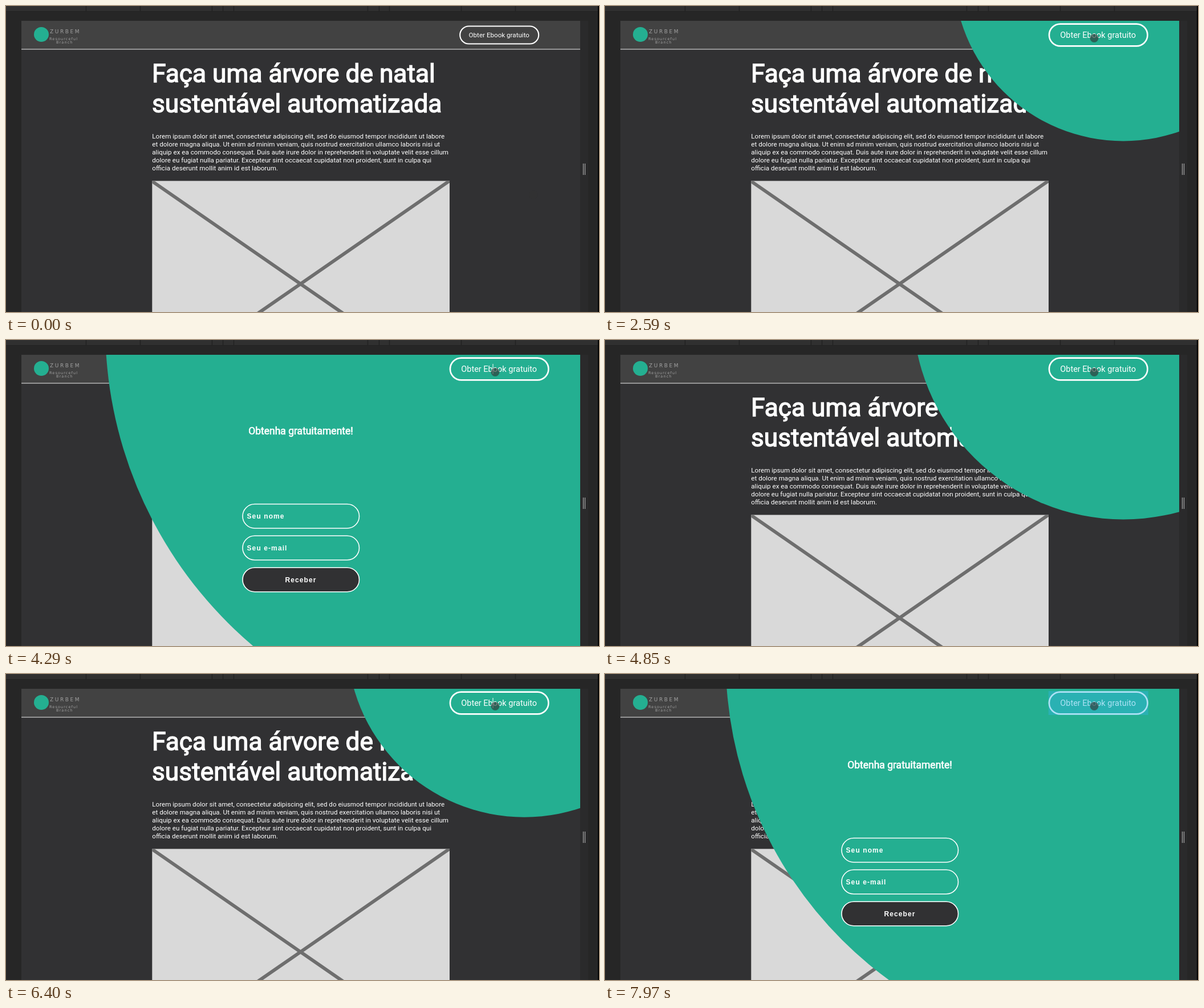
These frames come from a looping animation (1040 by 538 pixels, 8000 ms). An HTML page:

```html
<!DOCTYPE html>
<html lang="pt-BR">
<head>
<meta charset="utf-8">
<title>Ebook gratuito</title>
<style>
html, body { margin: 0; width: 100%; height: 100%; overflow: hidden; background: #262626; }
svg { display: block; width: 1040px; height: 538px; }
text { font-family: Roboto, sans-serif; fill: #fff; white-space: pre; }
.title { font-size: 44.3px; stroke: #fff; stroke-width: 1.4px; }
.body { font-size: 11.63px; }
.lead { font-size: 17.5px; stroke: #fff; stroke-width: .65px; }
.field { font: bold 12px "Liberation Sans", Arial, sans-serif; letter-spacing: 1.1px; }
.brand text { font-family: "DejaVu Sans", sans-serif; fill: #a2a2a2; }
.pill { fill: none; stroke: #fff; stroke-width: 1.6; }
.cross { stroke: #6e6e6e; stroke-width: 6; filter: blur(.7px); }
</style>
</head>
<body>
<svg viewBox="0 0 1040 538">
  <defs>
    <clipPath id="page"><rect x="27" y="26" width="980" height="512"/></clipPath>
    <clipPath id="photo"><rect x="256.3" y="307.4" width="521.7" height="362"/></clipPath>
    <clipPath id="reveal"><circle id="hole" cx="909" cy="-86" r="0"/></clipPath>
  </defs>

  <rect width="1040" height="538" fill="#262626"/>
  <rect width="1040" height="9" fill="#303030"/>
  <path d="M0 9.5H1040" stroke="#222"/>
  <path id="ticks" stroke="#222" stroke-width="1.5"/>
  <rect x="1007" y="26" width="14" height="512" fill="#2a2a2b"/>
  <rect x="1038" width="2" height="538" fill="#000"/>
  <path d="M1012.5 277V297M1015.5 277V297" stroke="#a8a8a8" stroke-width="1.2"/>

  <g clip-path="url(#page)">
    <rect x="27" y="26" width="980" height="512" fill="#313133"/>
    <rect x="27" y="26" width="980" height="50" fill="#424242"/>
    <path d="M27 76H1007" stroke="#b4b4b4" stroke-width="1.5"/>
    <g class="brand">
      <circle cx="62" cy="50" r="13" fill="#24af91"/>
      <text x="77" y="48" font-size="9" letter-spacing="2.6">ZURBEM</text>
      <text x="76" y="59.5" font-size="6.5" letter-spacing="1.1">Resourceful</text>
      <text x="88" y="65.5" font-size="6.5" letter-spacing="1.1">Branch</text>
    </g>
    <text class="title" x="256" y="134">Faça uma árvore de natal</text>
    <text class="title" x="256" y="187">sustentável automatizada</text>
    <g id="copy"></g>
    <g clip-path="url(#photo)">
      <rect x="256" y="307" width="522" height="363" fill="#d9d9d9"/>
      <path class="cross" d="M255.5 307.6L777.5 669.6M777.5 307.6L255.5 669.6"/>
    </g>

    <g clip-path="url(#reveal)">
      <rect x="27" y="26" width="980" height="512" fill="#24af91"/>
      <text class="lead" x="517" y="166" text-anchor="middle">Obtenha gratuitamente!</text>
      <rect class="pill" x="415" y="288.5" width="204.5" height="42.5" rx="21.2"/>
      <rect class="pill" x="415" y="344.3" width="204.5" height="42.5" rx="21.2"/>
      <rect class="pill" x="415" y="400.2" width="204.5" height="42.5" rx="21.2" style="fill:#313133"/>
      <text class="field" x="422.5" y="314">Seu nome</text>
      <text class="field" x="422.5" y="370">Seu e-mail</text>
      <text class="field" x="489.5" y="426">Receber</text>
    </g>

    <g id="button">
      <rect class="pill" x="-69" y="-15.5" width="138" height="31" rx="15.5" style="stroke-width:2.1"/>
      <text class="body" x="-.4" y="4.1" text-anchor="middle">Obter Ebook gratuito</text>
      <rect id="flash" x="-70" y="-16.8" width="140" height="33.6" fill="rgba(51,181,229,.4)"/>
    </g>
    <rect id="caret" x="853.5" y="42" width="1" height="18" fill="#fff"/>
    <circle id="touch" r="7.5" fill="rgba(50,50,50,.62)"/>
  </g>
</svg>
<script>
const LOOP = 8000;
const el = id => document.getElementById(id);

// Linear interpolation through [time, value] points, held at both ends
function along(t, points) {
  if (t <= points[0][0]) return points[0][1];
  for (let i = 1; i < points.length; i++) {
    const [t0, v0] = points[i - 1], [t1, v1] = points[i];
    if (t < t1) return v0 + (v1 - v0) * (t - t0) / (t1 - t0);
  }
  return points[points.length - 1][1];
}
const within = (t, spans) => spans.some(([a, b]) => t >= a && t < b);
const show = (id, on) => el(id).setAttribute("visibility", on ? "visible" : "hidden");

const OPEN = [[0, 100], [320, 310], [690, 538], [800, 608], [900, 656], [1000, 693], [1100, 721], [1170, 735]];
const CLOSE = [[0, 735], [80, 722], [160, 698], [250, 637], [360, 547], [560, 370], [790, 215], [1020, 110], [1060, 100]];
const MOVES = [[2290, OPEN], [4290, CLOSE], [6080, OPEN], [7810, CLOSE]];
const TAPS = [2190, 4290, 6080, 7810].map(t => [t + 80, t + 250]);
const CARET = [[3820, 4340], [5700, 6450]];
const TOUCH_X = [[100, 925], [330, 872], [740, 872], [1330, 858]];
const TOUCH_Y = [[100, 332], [330, 122], [740, 122], [1330, 56.5]];
const GROW = [[2190, 1], [2270, 1.08], [2350, 1.19], [2490, 1.25]];

function radius(t) {
  let r = 0;
  for (const [start, curve] of MOVES) if (t >= start) r = along(t - start, curve);
  return r;
}

function draw(t) {
  const r = radius(t);
  el("hole").setAttribute("r", r);
  el("hole").setAttribute("cy", -86 + 0.087 * r);
  el("button").setAttribute("transform", `translate(865.2 51) scale(${along(t, GROW)})`);
  el("touch").setAttribute("cx", along(t, TOUCH_X));
  el("touch").setAttribute("cy", along(t, TOUCH_Y));
  show("flash", within(t, TAPS));
  show("caret", within(t, CARET));
}

el("ticks").setAttribute("d",
  [140, 235, 361, 380, 399, 634, 654, 672, 798, 893].map(x => `M${x + .5} 0V9`).join(""));

el("copy").innerHTML = [
  "Lorem ipsum dolor sit amet, consectetur adipiscing elit, sed do eiusmod tempor incididunt ut labore",
  "et dolore magna aliqua. Ut enim ad minim veniam, quis nostrud exercitation ullamco laboris nisi ut",
  "aliquip ex ea commodo consequat. Duis aute irure dolor in reprehenderit in voluptate velit esse cillum",
  "dolore eu fugiat nulla pariatur. Excepteur sint occaecat cupidatat non proident, sunt in culpa qui",
  "officia deserunt mollit anim id est laborum."
].map((line, i) => `<text class="body" x="256.3" y="${232.7 + 14 * i}">${line}</text>`).join("");

const begin = performance.now();
function tick() {
  draw((performance.now() - begin) % LOOP);
  requestAnimationFrame(tick);
}
tick();
</script>
</body>
</html>
```
